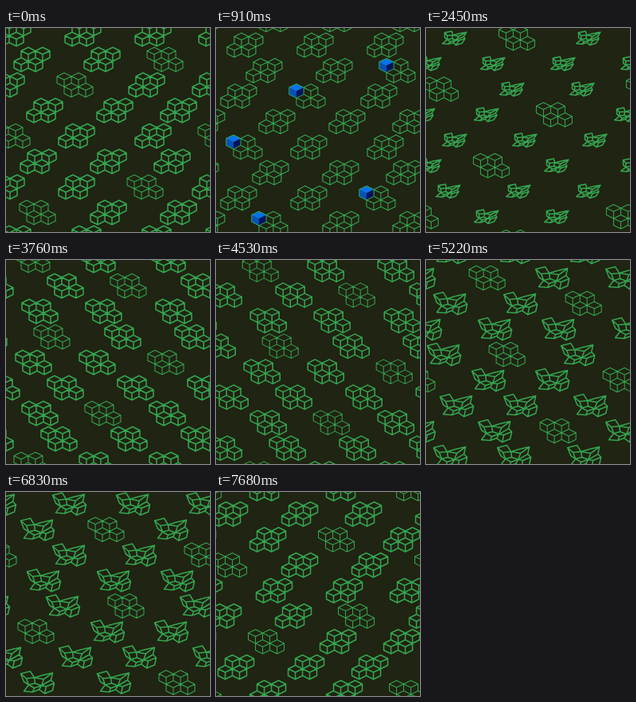
Animation of 256x256 px, one loop 7750 ms. Source, as an HTML page with a canvas:

```html
<!DOCTYPE html>
<html lang="en">
<head>
<meta charset="utf-8">
<title>Cube pattern</title>
<style>
  html, body { margin: 0; width: 100%; height: 100%; overflow: hidden; background: #202412; }
  canvas { display: block; width: 100vw; height: 100vh; }
</style>
</head>
<body>
<canvas id="stage" width="256" height="256"></canvas>
<script>
(() => {
const SIZE = 256, LOOP = 7750, STEP = 76.75, BEAT = 2540;
const SPEED = [0.0303, 0.01515];
const BACK = '#202412', GREEN = '#34a450';
const BLUES = ['#0a72ea', '#0750b8', '#04135c'];

const canvas = document.getElementById('stage');
const ctx = canvas.getContext('2d');

// Piece centres row by row; odd gives the index of the odd piece.
const rows = [
  { xs: [8, 96, 184] },
  { xs: [32, 120, 199], odd: 2 },
  { xs: [0, 86, 176], odd: 1 },
  { xs: [48, 136, 216] },
  { xs: [7, 88, 184], odd: 0 },
  { xs: [40, 128, 208] },
  { xs: [0, 88, 174], odd: 2 },
  { xs: [39, 128, 216], odd: 0 }
];
const pieces = rows.flatMap(({ xs, odd }, r) =>
  xs.map((x, i) => ({ x: x + 0.5, y: 7.5 + 32 * r, odd: i === odd })));

// Corner points of the four cubes, from top to bottom.
const line = (y, ...xs) => xs.map(x => [x, y]);
const left = [
  ...line(-15.25, -13.5, 4.5),
  ...line(-10.75, -22.5, -4.5, 13.5),
  ...line(-6.5, -13.5, 4.5),
  ...line(-2.25, -22.5, -4.5, 13.5),
  ...line(2.25, -13.5, 4.5, 22.5),
  ...line(6.5, -4.5, 13.5),
  ...line(10.75, -13.5, 4.5, 22.5),
  ...line(15.25, -4.5, 13.5)
];
const right = left.map(([x, y]) => [-x, y]);
const tangle = [
  [-9, -14], [6, -9],
  [-21, -11], [-4, -6], [19, -12],
  [-14, -5], [8, -4],
  [-17, -1], [-3, 1], [17, -3],
  [-11, 3], [5, 4], [21, 1],
  [-4, 7], [11, 5],
  [-17, 11], [2, 9], [19, 10],
  [-6, 12], [9, 14]
];
const knot = tangle.map(([x, y]) => [0.68 * x - 0.25 * y, 0.62 * y]);

// Each cube: centre, then corners clockwise from the top.
const cubes = [
  [5, 0, 3, 8, 10, 7, 2],
  [6, 1, 4, 9, 11, 8, 3],
  [13, 8, 11, 16, 18, 15, 10],
  [14, 9, 12, 17, 19, 16, 11]
];

const edges = (() => {
  const seen = new Map();
  const add = (a, b) => seen.set(Math.min(a, b) * 32 + Math.max(a, b), [a, b]);
  for (const [c, ...ring] of cubes) {
    ring.forEach((p, i) => add(p, ring[(i + 1) % 6]));
    [1, 3, 5].forEach(i => add(c, ring[i]));
  }
  return [...seen.values()];
})();

const poses = [
  [0, right], [2290, right], [2450, knot], [2620, left],
  [4850, left], [5130, tangle], [7380, tangle], [7630, right], [LOOP + STEP, right]
];

const ease = k => k * k * (3 - 2 * k);

function poseAt(t) {
  const i = poses.findIndex(([end]) => t < end);
  const [t0, from] = poses[i - 1], [t1, to] = poses[i];
  const k = ease((t - t0) / (t1 - t0));
  return from.map(([x, y], n) => [x + (to[n][0] - x) * k, y + (to[n][1] - y) * k]);
}

function wire(points) {
  const path = new Path2D();
  for (const [a, b] of edges) {
    path.moveTo(...points[a]);
    path.lineTo(...points[b]);
  }
  return path;
}

function face(...ids) {
  const path = new Path2D();
  ids.forEach(id => path.lineTo(...left[id]));
  path.closePath();
  return path;
}

// Top, left and right face of the first cube, and its outline.
const [hub, ...rim] = cubes[0];
const faces = [
  face(hub, rim[5], rim[0], rim[1]),
  face(hub, rim[3], rim[4], rim[5]),
  face(hub, rim[1], rim[2], rim[3])
];
const outline = face(...rim);
const oddWire = wire(left);

const wrap = v => ((v % SIZE) + SIZE) % SIZE;

function drawPiece(piece, path, lit) {
  ctx.lineWidth = piece.odd ? 1.05 : lit ? 1.15 : 1.55;
  ctx.stroke(piece.odd ? oddWire : path);
  if (piece.odd && lit) {
    faces.forEach((f, i) => {
      ctx.fillStyle = BLUES[i];
      ctx.fill(f);
    });
    ctx.lineWidth = 0.7;
    ctx.stroke(outline);
  }
}

function draw(t) {
  const beat = t % BEAT;
  const lit = beat > 480 && beat < 1140;
  const path = wire(poseAt(t));

  ctx.setTransform(1, 0, 0, 1, 0, 0);
  ctx.fillStyle = BACK;
  ctx.fillRect(0, 0, SIZE, SIZE);
  ctx.strokeStyle = GREEN;
  ctx.lineCap = ctx.lineJoin = 'round';

  for (const piece of pieces) {
    const px = wrap(piece.x + SPEED[0] * t);
    const py = wrap(piece.y + SPEED[1] * t);
    for (const x of [px - SIZE, px, px + SIZE]) {
      for (const y of [py - SIZE, py, py + SIZE]) {
        if (x < -25 || x > SIZE + 25 || y < -18 || y > SIZE + 18) continue;
        ctx.setTransform(1, 0, 0, 1, x, y);
        drawPiece(piece, path, lit);
      }
    }
  }
}

const start = performance.now();

function tick() {
  const t = Math.max(0, performance.now() - start) % LOOP;
  draw(Math.min(100, Math.floor((t + 11) / STEP)) * STEP);
  requestAnimationFrame(tick);
}
tick();
})();
</script>
</body>
</html>
```
